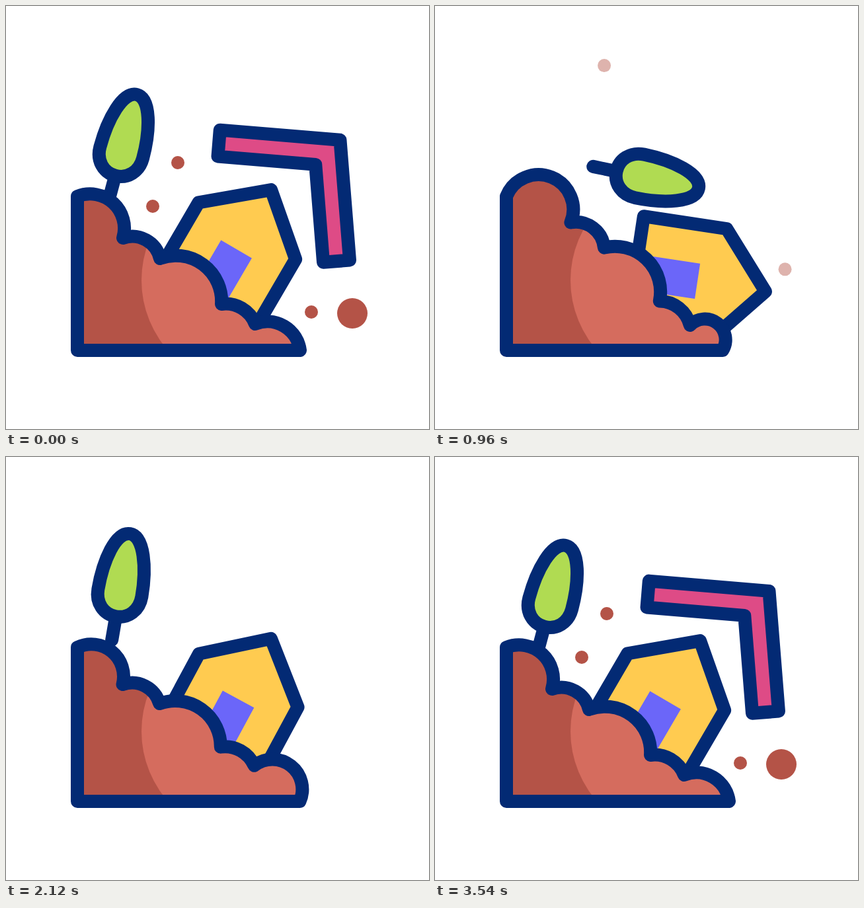
Recreate the animation shown at these times as an HTML page. Size 640 by 640 pixels, loop 3600 ms.

```html
<!DOCTYPE html>
<html lang="en">
<head>
<meta charset="utf-8">
<title>Landslide</title>
<style>
  html, body { margin: 0; width: 100%; height: 100%; overflow: hidden; background: #fff; }
  svg { display: block; width: 100%; height: 100%; }
  .line { stroke: #032a74; stroke-width: 20; stroke-linejoin: round; stroke-linecap: round; }
</style>
</head>
<body>
<svg viewBox="0 0 640 640">
  <defs><clipPath id="mudClip"><path class="mud"/></clipPath></defs>
  <g id="dots" fill="#b45347"></g>
  <g id="house">
    <path fill="#ffcb50" d="M26-142L111-70V57H-59V-70Z"/>
    <path fill="#6b66f9" d="M-1-38H53V57H-1Z"/>
    <path class="line" fill="none" d="M26-142L111-70V57H-59V-70Z"/>
  </g>
  <g id="tree" class="line" fill="#b0db52">
    <path d="M0 0V-36"/>
    <path d="M0-36C19-36 33.5-51 33.5-72C33.5-116 22-163 0-163S-33.5-116-33.5-72C-33.5-51-19-36 0-36Z"/>
  </g>
  <path class="mud" fill="#b45347"/>
  <circle cx="365" cy="415" r="160" fill="#d56c5e" clip-path="url(#mudClip)"/>
  <path class="mud line" fill="none"/>
  <path id="roof" class="line" fill="#de4b86" d="M0-115L139 3L113 33.5L0-62.5L-113 33.5L-139 3Z"/>
</svg>
<script>
const LOOP = 3600, SLIDE = 90, RETURN = 1352, SETTLE = 2460, LAND = 2800, STILL = 3550;

const $ = id => document.getElementById(id);
const span = (t, from, length) => Math.min(1, Math.max(0, (t - from) / length));
const easeOut = u => 1 - (1 - u) ** 3;
const easeInOut = u => u < .5 ? 4 * u ** 3 : 1 - 4 * (1 - u) ** 3;

// Shares of the three poses: at rest, blown away, heaped up.
function shares(t, lag = 0) {
  const out = easeOut(span(t, SLIDE, 1200));
  const back = easeInOut(span(t, RETURN + lag, 1000));
  const settle = easeInOut(span(t, SETTLE, 440));
  return [1 - out + settle, out - back, back - settle];
}
const mix = (w, ...values) => values.reduce((sum, v, i) => sum + v * w[i], 0);

// Damped sway after the roof lands.
const swing = t => t < LAND || t > STILL ? 0
  : Math.sin(Math.PI * (t - LAND) / 300) * ((STILL - t) / (STILL - LAND)) ** 1.5;

function place(id, x, y, angle) {
  $(id).setAttribute('transform', `translate(${x} ${y}) rotate(${angle})`);
}

function drawHouse(t) {
  const w = shares(t, 20);
  place('house', mix(w, 307, 364.6, 307), mix(w, 387.6, 385, 387.6), mix(w, 30.3, 100, 23.5));
}

function drawTree(t) {
  const w = shares(t, 36);
  const hop = 152 * w[1] * (1 - w[1]);
  place('tree', mix(w, 156, 241, 153.5), mix(w, 291.5, 245, 291) - hop,
    mix(w, 15, 103.5, 2) + 9 * swing(t));
}

function drawRoof(t) {
  if (t < RETURN) {
    const q = Math.max(0, (t - SLIDE) / 530);
    place('roof', 424 + 271 * q, 284 - 221 * q ** 3, 45.1 + 65 * q);
  } else {
    const p = Math.min(2.2, Math.max(0, (LAND - t) / 340));
    place('roof', 424 + 33 * p, 284 - 249 * p, 45.1 - 32 * p + 14 * swing(t));
  }
}

// Each knee shifts in proportion to its distance along the slope.
const knees = [[177, 351, 0], [233, 382, 43], [326, 451, 69], [377, 481, 48]];

function drawMud(t) {
  const w = shares(t);
  const arc = (r, x, y) => `A${r} ${r} 0 0 1 ${x} ${y}`;
  let d = 'M108 521V288';
  for (const [x, y, r] of knees) {
    const k = x - 177;
    d += arc(r || mix(w, 52, 48, 49),
      x + mix(w, 0, 29 - .1 * k, -2), y + mix(w, 0, .13 * k - 24, -6 - .045 * k));
  }
  d += arc(mix(w, 50, 31, 46), mix(w, 445, 435, 445), 521) + 'Z';
  document.querySelectorAll('.mud').forEach(el => el.setAttribute('d', d));
}

// at: resting place, fly: flight out, from: offset at re-entry
const dots = [
  { r: 10, at: [260, 237], fly: [-4, -150], from: [67, 12], fade: 850, enter: 2400 },
  { r: 10, at: [222, 303], fly: [95, -80], from: [47, 59], fade: 850, enter: 2200 },
  { r: 10, at: [462, 463], fly: [69, -66], from: [-68, -117], fade: 850, enter: 2570 },
  { r: 23, at: [524, 465], fly: [73, 28], from: [-86, -113], fade: 552, enter: 2200 }
];
for (const dot of dots) {
  dot.el = document.createElementNS('http://www.w3.org/2000/svg', 'circle');
  dot.el.setAttribute('r', dot.r);
  $('dots').append(dot.el);
}

function drawDot(dot, t) {
  const leaving = t < RETURN;
  const shift = leaving ? dot.fly : dot.from;
  const far = leaving ? easeOut(span(t, SLIDE, 1200)) : (1 - span(t, dot.enter, 620)) ** 2;
  dot.el.setAttribute('cx', dot.at[0] + shift[0] * far);
  dot.el.setAttribute('cy', dot.at[1] + shift[1] * far);
  dot.el.setAttribute('opacity', leaving ? 1 - span(t, dot.fade, 200) : span(t, dot.enter, 200));
}

const start = performance.now();
function tick() {
  const t = (performance.now() - start) % LOOP;
  [drawHouse, drawTree, drawRoof, drawMud].forEach(draw => draw(t));
  dots.forEach(dot => drawDot(dot, t));
  requestAnimationFrame(tick);
}
tick();
</script>
</body>
</html>
```
